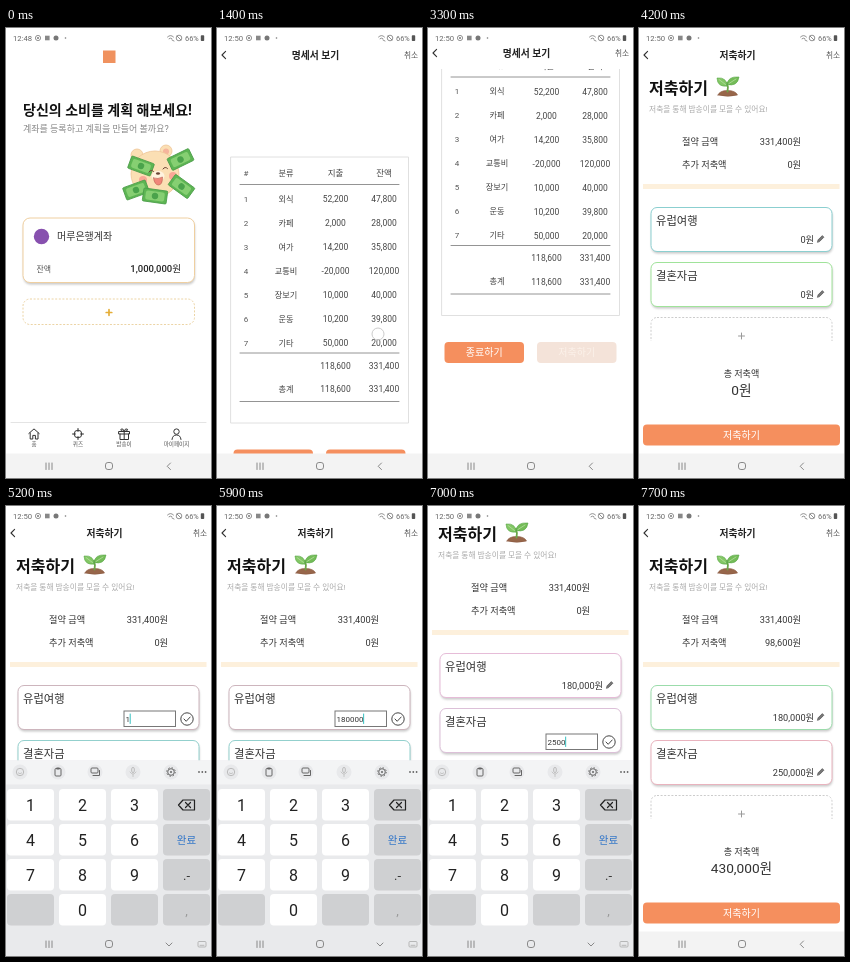
Write an HTML page that moves like this. It is 205x450 px and loops after 8000 ms.

```html
<!DOCTYPE html>
<html lang="ko">
<head>
<meta charset="utf-8">
<title>저축 앱</title>
<style>
html, body { margin: 0; width: 100%; height: 100%; overflow: hidden; background: #fff; }
svg { display: block; width: 100vw; height: 100vh; }
text { font-family: Roboto, "Noto Sans CJK KR", "Noto Sans CJK", sans-serif; }
</style>
</head>
<body>
<svg id="stage" viewBox="0 0 205 450"></svg>
<script>
const LOOP = 8000, STEP = 100, SAVED = 331400;
const INK = '#333', ORANGE = '#f58f5e';
const stage = document.getElementById('stage');

// ---- helpers ----
// y is the vertical middle of the text; anchor is s, m or e
function text(x, y, str, size, fill = INK, anchor = 'm', weight = 400) {
  const a = { s: 'start', m: 'middle', e: 'end' }[anchor];
  return `<text x="${x}" y="${y + size * 0.36}" font-size="${size}" fill="${fill}" text-anchor="${a}" font-weight="${weight}">${str}</text>`;
}
function rect(x, y, w, h, fill, rx = 0, more = '') {
  return `<rect x="${x}" y="${y}" width="${w}" height="${h}" rx="${rx}" fill="${fill}" ${more}/>`;
}
function path(d, stroke = INK, width = 1, fill = 'none') {
  return `<path d="${d}" stroke="${stroke}" stroke-width="${width}" fill="${fill}" stroke-linecap="round" stroke-linejoin="round"/>`;
}
function circle(x, y, r, fill, more = '') {
  return `<circle cx="${x}" cy="${y}" r="${r}" fill="${fill}" ${more}/>`;
}
function ellipse(x, y, rx, ry, fill, more = '') {
  return `<ellipse cx="${x}" cy="${y}" rx="${rx}" ry="${ry}" fill="${fill}" ${more}/>`;
}
function group(body, more) { return `<g ${more}>${body}</g>`; }
function outline(color, width = 1) { return `stroke="${color}" stroke-width="${width}"`; }
function num(n) { return n.toLocaleString('en-US'); }
function won(n) { return num(n) + '원'; }
// linear interpolation through [time, value] pairs
function track(t, keys) {
  if (t <= keys[0][0]) return keys[0][1];
  for (let i = 1; i < keys.length; i++) {
    const [t0, a] = keys[i - 1], [t1, b] = keys[i];
    if (t < t1) return a + (b - a) * (t - t0) / (t1 - t0);
  }
  return keys[keys.length - 1][1];
}
function plus(x, y, r, color, w) { return path(`M${x - r} ${y}h${2 * r}M${x} ${y - r}v${2 * r}`, color, w); }
function touch(x, y) { return circle(x, y, 6, '#fff', 'fill-opacity=".4" stroke="#ccc" stroke-width="1"'); }
function frame(x, y, w, h, color, rx) {
  return rect(x + 0.5, y + 2, w, h, '#777', rx, 'opacity=".4" filter="url(#soft)"') +
    rect(x, y, w, h, '#fff', rx, outline(color));
}
function button(x, y, w, label, fill = ORANGE, ink = '#fff') {
  return rect(x, y, w, 21, fill, 4) + text(x + w / 2, y + 10.5, label, 10, ink, 'm', 500);
}

// ---- system bars ----
function statusBar(clock) {
  const c = '#777';
  return text(7, 10, clock, 7.7, '#666', 's') +
    circle(32, 10, 2.6, 'none', outline(c, 0.8)) + circle(32, 10, 1, c) +
    rect(39, 7.7, 4.6, 4.6, '#888') + circle(50, 10, 2.5, '#777') + circle(59.5, 10, 0.8, c) +
    path('M161.5 9q3-3 6 0M163 10.7q1.5-1.3 3 0M166 12l2 1', c, 0.8) +
    circle(173, 10, 2.8, 'none', outline(c, 0.8)) + path('M171 8l4 4', c, 0.8) +
    text(179, 10, '66%', 7.4, '#666', 's') + rect(194.8, 7.2, 3.4, 5.8, '#555', 0.8);
}
function navIcons(open) {
  const c = '#888';
  return path('M40 435v6.5M43 435v6.5M46 435v6.5', c) +
    rect(99.5, 434.5, 7, 7, 'none', 2.4, outline(c)) +
    (open ? path('M160 437l3 3 3-3', c) + rect(192, 435.5, 8, 5.5, 'none', 1, outline('#aaa', 0.8)) + path('M194 439.3h4', '#aaa', 0.8)
          : path('M164.5 435l-3.3 3.3 3.3 3.3', c));
}
function header(title, y) {
  return path(`M8.6 ${y - 3.6}l-3.6 3.6 3.6 3.6`, INK, 1.1) +
    text(98.5, y, title, 9.8, '#222', 'm', 700) + text(194, y, '취소', 7.7, '#555');
}

// ---- home ----
function bill(x, y, turn) {
  return group(rect(-12, -6.5, 24, 13, '#5db553', 1, outline('#4a9c48', 0.8)) +
    rect(-9.5, -4.5, 19, 9, '#86cf72', 2) + circle(0, 0, 3.2, '#4aa34b'), `transform="translate(${x} ${y}) rotate(${turn})"`);
}
function bear() {
  const fur = '#fbdfb4', edge = outline('#efc596', 0.8), dark = '#6b4435';
  return circle(131, 127, 6, fur, edge) + circle(160, 123, 6, fur, edge) + circle(160, 123.5, 3, '#f6b59c') +
    ellipse(149, 146, 24, 23, fur, edge) + bill(135, 138, 20) +
    circle(137, 152, 4, '#f9a796') + circle(167, 148, 4, '#f9a796') +
    path('M143 144q2-3 4.500-.5M157 141q2-3 4.500-.5', dark, 1) +
    ellipse(152, 148, 6.5, 5, '#fff3df') + ellipse(152, 145.5, 2, 1.3, dark) +
    path('M147.500 150q4.500 1.500 9-1q0 8-4 8q-4 0-5-7z', '#b9604f', 0.6, '#f08679') +
    bill(174.5, 131.5, -26) + bill(130, 162, -20) + bill(149, 168, 8) + bill(175.5, 158.5, 36);
}
function home() {
  const tabs = [[28, '홈'], [72, '퀴즈'], [118, '밤송이'], [170.5, '마이페이지']];
  return rect(97, 22.5, 12.5, 12.5, '#f0925f') +
    text(17, 82, '당신의 소비를 계획 해보세요!', 14, '#111', 's', 700) +
    text(17, 101, '계좌를 등록하고 계획을 만들어 볼까요?', 9, '#888', 's') + bear() +
    frame(17, 190, 171.5, 64.5, '#efcfa0', 7) + circle(35.5, 208.5, 7.7, '#8750ae') +
    text(51, 208.5, '머루은행계좌', 10, INK, 's') + text(30.5, 241, '잔액', 7.9, '#555', 's') +
    text(175, 241, won(1000000), 9.5, '#222', 'e', 500) +
    rect(17, 271, 171.5, 25.5, '#fff', 7, outline('#ecd4a5') + ' stroke-dasharray="2 1.6"') +
    plus(103, 284.5, 2.8, '#e5ae38', 1.7) +
    path('M5 394.5h195', '#ddd', 0.8) +
    path('M22.8 405.5l5.2-4.6 5.2 4.6M24.2 405v6h2.6v-3.6h2.6v3.6h2.6v-6') +
    circle(72, 406, 3.8, 'none', outline(INK)) + path('M72 400.5v3M72 408.5v3M66.5 406h3M74.5 406h3') +
    path('M113 403.5h10.5v2.5h-10.5zM114 406v5.5h8.5v-5.5M118.2 403.5v8M118.2 403.5q-4.5-.5-3-2.5q2-1 3 2.5q1-3.5 3-2.5q1.5 2-3 2.5') +
    circle(170.5, 403.6, 2.7, 'none', outline(INK)) + path('M166 411.5q.5-4.5 4.5-4.5t4.5 4.5') +
    tabs.map(([x, s]) => text(x, 416.3, s, 5.6, '#555')).join('');
}

// ---- statement ----
const ROWS = [['외식', 52200, 47800], ['카페', 2000, 28000], ['여가', 14200, 35800], ['교통비', -20000, 120000],
  ['장보기', 10000, 40000], ['운동', 10200, 39800], ['기타', 50000, 20000]];

function statement(t) {
  const top = track(t, [[1400, 171], [1500, 160], [1600, 122], [1700, 88], [1800, 68], [1900, 61], [2000, 61], [2100, 63.5]]);
  const pressed = t >= 3200;
  const cells = (y, a, b, c, d) => text(29, y, a, 8, '#555') + text(69, y, b, 8.2, '#444') +
    text(118.5, y, c, 8.5, '#444') + text(167, y, d, 8.5, '#444');
  const rule = y => path(`M23 ${y}h159`, '#888', 0.9);
  const sum = k => num(ROWS.reduce((s, r) => s + r[k], 0));
  let body = path(`M14 ${top - 42}h177.5v266h-177.5z`, '#ddd', 0.9) +
    cells(top - 26, '#', '분류', '지출', '잔액') + rule(top - 14.5);
  ROWS.forEach((r, i) => { body += cells(top + i * 24, i + 1, r[0], num(r[1]), num(r[2])); });
  body += rule(top + 154) + cells(top + 166.5, '', '', sum(1), sum(2)) +
    cells(top + 190, '', '총계', sum(1), sum(2)) + rule(top + 202.5) +
    button(16.5, top + 250.5, 79.5, '종료하기') +
    button(109, top + 250.5, 79.5, '저축하기', pressed ? '#f4e3d9' : ORANGE, pressed ? '#fbf1e9' : '#fff');
  const bar = track(t, [[1400, 0], [1500, 1], [2100, 1], [2300, 0]]);
  const barY = 145 - (top - 61) * 0.66;
  return group(body, 'clip-path="url(#sheet)"') +
    header('명세서 보기', t < 3200 ? 27 : 25) +
    rect(198.8, barY, 2, 258, '#999', 1, `opacity="${bar}"`) +
    (t >= 1400 && t < 2000 ? touch(161, 196 + top - 61) : '');
}

// ---- savings ----
function seedling() {
  return path('M79 67q1.500-4.500 9.500-4.500t10 4.500q-9.500 2.500-19.500 0z', '#8a5a42', 0.6, '#97664a') +
    path('M88.500 63.500q1-5-.5-9', '#6ba548', 1.8) +
    path('M88 58q-9.500 1.500-10-8q10-1 10 8z', '#5aa648', 0.6, '#83c765') +
    path('M88.300 56.500q0-8.500 11.700-7.500q-1.500 10-11.700 7.500z', '#5aa648', 0.6, '#74bc58') +
    path('M80 51.500l6.500 5M90 55.500l7-4.500', '#b5dfa0', 0.8);
}
function goal(y, name, color, amount, editing, typed) {
  let s = frame(12, y, 181, 44, color, 6) + text(17, y + 13.5, name, 11.3, INK, 's');
  if (!editing) {
    return s + text(175, y + 32.5, won(amount), 9.2, INK, 'e') +
      path(`M178.5 ${y + 34.5}l.6-2.2 4.2-4.2 1.6 1.6-4.2 4.2z`, '#555', 0.7, '#777');
  }
  const caret = 119.7 + typed.length * 4.49;
  return s + rect(118, y + 25.5, 51.5, 15.5, '#fff', 0, outline('#777')) +
    text(119.5, y + 33.5, typed || '예) 150000', 8, typed ? INK : '#aaa', 's') +
    path(`M${caret} ${y + 28.5}v9.5`, '#35bfc0', 1) +
    circle(181, y + 33.5, 6.2, '#fff', outline('#444')) + path(`M178 ${y + 33.5}l2.2 2.3 4-4.3`, '#444');
}
function typed(t, digits, start) {
  return digits.slice(0, Math.max(0, Math.floor((t - start) / STEP) + 1));
}
function borders(t) {
  if (t < 4200) return ['#9cc3e0', '#79cfc9'];
  if (t < 4800) return ['#8bcfd0', '#a0e39a'];
  if (t < 6200) return ['#cdb5bd', '#93d0cd'];
  if (t < 7400) return ['#e6bcd8', '#dcc0d8'];
  return ['#9bdcab', t < 7700 ? '#dfb39f' : '#e9b3be'];
}
function savings(t) {
  const first = t >= 6300 ? 180000 : 0, second = t >= 7400 ? 250000 : 0, total = first + second;
  const [c1, c2] = borders(t);
  const line = (y, label, n) => text(43, y, label, 9.2, INK, 's') + text(162, y, won(n), 9.2, INK, 'e');
  return header('저축하기', 27) + text(10, 60, '저축하기', 16, '#111', 's', 700) + seedling() +
    text(10, 81, '저축을 통해 밤송이를 모을 수 있어요!', 7.75, '#aaa', 's') +
    line(114, '절약 금액', SAVED) + line(137, '추가 저축액', Math.max(0, total - SAVED)) +
    rect(4, 156, 196.5, 5, '#fdf0dc') +
    goal(179.5, '유럽여행', c1, first, t >= 4800 && t < 6300, typed(t, '180000', 5200)) +
    goal(234.5, '결혼자금', c2, second, t >= 6400 && t < 7400, typed(t, '250000', 6700)) +
    group(rect(12, 289.5, 181, 44, '#fff', 6, outline('#ccc') + ' stroke-dasharray="2 1.6"') + plus(102.5, 308, 3, '#999', 1), 'clip-path="url(#list)"') +
    text(102.5, 346, '총 저축액', 9.1) + text(102.5, 362, won(total), 13.7) +
    button(4, 396.5, 197, '저축하기');
}

// ---- keyboard ----
function keyboard() {
  const c = '#666';
  let s = rect(0, 254.5, 205, 196, '#e9eaec') + rect(0, 254.5, 205, 24, '#f3f4f5');
  for (const x of [14, 52, 89, 127, 165]) s += circle(x, 266, 7.5, '#e8e9eb');
  s += circle(14, 266, 3.7, 'none', outline('#bbb')) + path('M12.3 267q1.7 1.7 3.4 0', '#bbb', 0.8) +
    rect(49, 262.5, 6, 7.5, 'none', 1, outline(c)) + rect(50.5, 261.5, 3, 2, c) +
    rect(85, 262, 7, 5, 'none', 1, outline(c)) + path('M87 269.5h6.5v-5', c) +
    rect(125.7, 261.5, 2.6, 5, 'none', 1.3, outline('#bbb')) + path('M124 266q3 4.5 6 0M127 268.5v2', '#bbb', 0.8) +
    circle(165, 266, 3.3, 'none', outline(c)) + circle(165, 266, 4.3, 'none', outline(c) + ' stroke-dasharray="1.4 2"') + circle(165, 266, 1, c) +
    [193, 196.3, 199.6].map(x => circle(x, 266, 0.9, c)).join('');
  for (let i = 0; i < 16; i++) {
    const col = i % 4, row = i >> 2, x = 1 + col * 52, y = 283 + row * 35;
    const digit = col < 3 && row < 3 ? row * 3 + col + 1 : row === 3 && col === 1 ? 0 : '';
    s += rect(x, y, 47, 31.5, digit === '' ? '#cfd0d2' : '#fff', 4) + text(x + 23.5, y + 16.5, digit, 16, '#222');
  }
  return s + path('M172.5 299l4.5-5h11.5v10h-11.5zM179.5 296.5l5 5M184.5 296.5l-5 5', '#222', 1.2) +
    text(180.5, 334, '완료', 10.5, '#2f74c8') + text(180.5, 369, '.-', 13) + text(180.5, 404, ',', 13, '#999');
}

const DEFS = `<defs><filter id="soft" x="-10%" y="-20%" width="120%" height="150%"><feGaussianBlur stdDeviation="1.3"/></filter>
<clipPath id="screen"><rect x="0" y="13.5" width="205" height="437"/></clipPath>
<clipPath id="sheet"><rect x="0" y="41" width="205" height="385"/></clipPath>
<clipPath id="list"><rect x="0" y="280" width="205" height="33"/></clipPath></defs>`;

function render(t) {
  // how far the keyboard is raised, 0 to 1
  const k = track(t, [[4800, 0], [4900, 0.18], [5000, 0.7], [5100, 1], [5900, 1], [6100, 0],
    [6400, 0], [6500, 0.18], [6600, 0.7], [6700, 1], [7200, 1], [7400, 0]]);
  const pan = t >= 6400 ? 32 * Math.pow(k, 0.8) : 0;
  let page;
  if (t < 1300) page = home();
  else if (t < 3400) page = statement(t);
  else if (t < 3500) page = group(statement(t), 'opacity=".35"') + group(savings(t), 'opacity=".65"');
  else page = savings(t);
  let s = DEFS + rect(0, 0, 205, 450, '#fff') +
    group(group(page, `transform="translate(0 ${-pan})"`), 'clip-path="url(#screen)"') +
    statusBar(t < 1300 ? '12:48' : '12:50') + rect(0, 425.5, 205, 25, '#f3f3f3');
  if (k > 0) s += group(keyboard(), `transform="translate(0 ${(1 - k) * 175})" opacity="${Math.min(1, k * 1.4)}"`);
  s += navIcons(k > 0.5);
  if (t === 4800 || t === 4900) s += touch(181, 212);
  if (t === 6400 || t === 6500) s += touch(148, 272);
  if (t === 6200) s += touch(181, 213);
  stage.innerHTML = s;
}

const start = performance.now();
let shown = -1;
function tick() {
  const t = Math.floor(((performance.now() - start) % LOOP) / STEP) * STEP;
  if (t !== shown) render(shown = t);
  requestAnimationFrame(tick);
}
tick();
</script>
</body>
</html>
```
